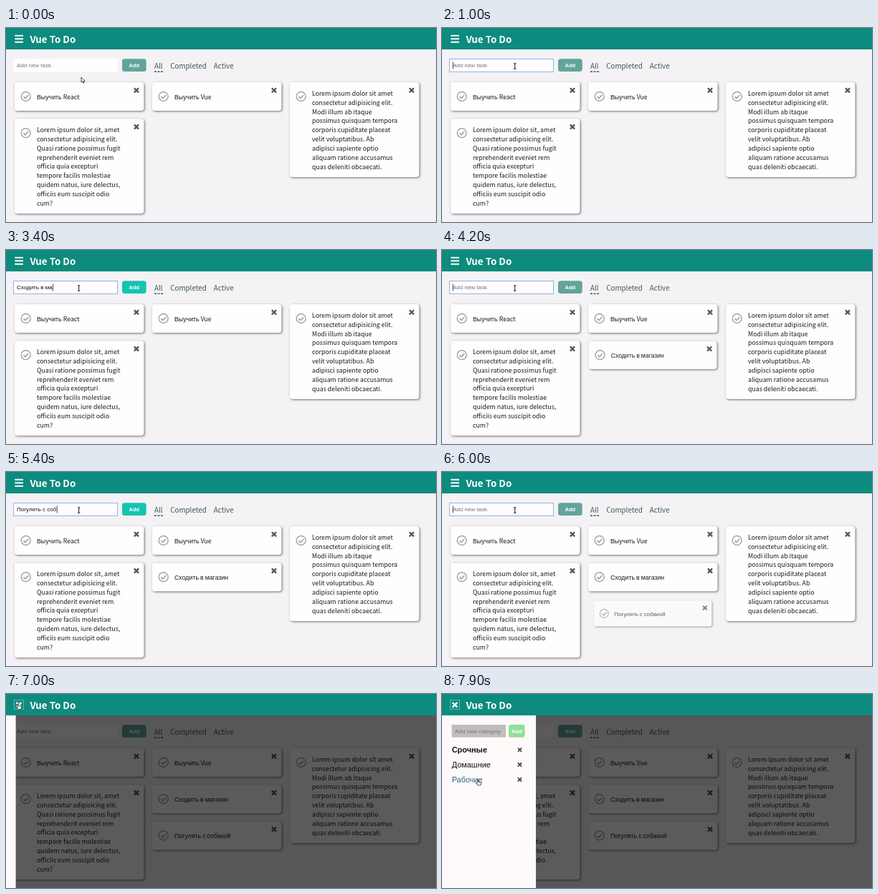
Animation of 600x272 px, one loop 8000 ms. Source, as an HTML page:

```html
<!DOCTYPE html>
<html lang="en">
<head>
<meta charset="utf-8">
<title>Vue To Do</title>
<style>
  html, body { margin: 0; width: 100%; height: 100%; overflow: hidden; background: #f4f2f4; }
  svg { display: block; width: 600px; height: 272px; }
  text { white-space: pre; font-family: "Noto Sans CJK SC", "Noto Sans CJK JP", "Noto Sans CJK", "Noto Sans", sans-serif; }
  .arial, .ru { font-family: "Liberation Sans", Arial, sans-serif; }
  .body { font-size: 8.8px; fill: #1c1a1c; }
  .field { font-size: 8px; }
  .button { font-size: 7.6px; font-weight: bold; fill: #fff; text-anchor: middle; }
  .tab { font-size: 9.84px; fill: #3f5857; }
  .category { font-size: 10.93px; }
  .paper { fill: #fffdff; filter: drop-shadow(1px 1px 1.4px rgba(0, 0, 0, .55)); }
  .line { fill: none; }
</style>
</head>
<body>
<svg id="stage" viewBox="0 0 600 272" xmlns="http://www.w3.org/2000/svg"></svg>
<script>
const LOOP = 8000, STEP = 100;
const FOCUS = 1000, FIRST_ADD = 4000, SECOND_ADD = 5900, MENU_OPEN = 6910;
const MENU_WIDTH = 131;

const cross = (x, y, r, color, width) =>
  `<path class="line" d="M${x - r} ${y - r}l${2 * r} ${2 * r}m0 ${-2 * r}l${-2 * r} ${2 * r}" stroke="${color}" stroke-width="${width}"/>`;

const label = (x, y, cls, text, attrs = '') =>
  `<text x="${x}" y="${y}" class="${cls}" ${attrs}>${text}</text>`;

const box = (x, y, w, h, fill, attrs = '') =>
  `<rect x="${x}" y="${y}" width="${w}" height="${h}" fill="${fill}" ${attrs}/>`;

// Cyrillic words use a different face from the Latin ones.
const mixed = text => text.replace(/[а-яё]+/gi, '<tspan class="ru">$&</tspan>');

function card(x, y, lines, id = '') {
  const tall = lines.length > 1;
  const text = lines.map((line, i) =>
    label(x + 31, tall ? y + 18.8 + i * 12.85 : y + 23.6, 'body', mixed(line))).join('');
  return `<g id="${id}">
    <rect class="paper" x="${x}" y="${y}" width="180.5" height="${tall ? 133 : 40}" rx="4"/>
    <g class="line" stroke="#a5a3a5" stroke-width="1.4">
      <circle cx="${x + 15.7}" cy="${y + 20}" r="6.5"/>
      <path d="M${x + 12.5} ${y + 20.2}l2.4 2.4 4.4-4.6" stroke-width="1.7"/>
    </g>
    ${cross(x + 170, y + 11.3, 3.1, '#565356', 2.3)}${text}</g>`;
}

const leftText = ['Lorem ipsum dolor sit, amet', 'consectetur adipisicing elit.',
  'Quasi ratione possimus fugit', 'reprehenderit eveniet rem', 'officia quia excepturi',
  'tempore facilis molestiae', 'quidem natus, iure delectus,', 'officiis eum suscipit odio', 'cum?'];
const rightText = ['Lorem ipsum dolor sit amet', 'consectetur adipisicing elit.',
  'Modi illum ab itaque', 'possimus quisquam tempora', 'corporis cupiditate placeat',
  'velit voluptatibus. Ab', 'adipisci sapiente optio', 'aliquam ratione accusamus', 'quas deleniti obcaecati.'];
const categories = ['Срочные', 'Домашние', 'Рабочие'];
const categoryY = i => 82.3 + i * 20.8;

const stage = document.getElementById('stage');
stage.innerHTML = `
  ${box(0, 0, 600, 272, '#f4f2f4')}
  ${box(10, 43, 146, 19, '#fffdff')}
  ${box(10.5, 43.5, 145, 18, 'none', 'id="ring" stroke="#8fb5e6"')}
  ${label(15, 55.2, 'arial field', '', 'id="entry"')}
  ${box(0, 47.5, .8, 10, '#222', 'id="caret"')}
  ${box(162, 43.3, 33.7, 17.7, '', 'id="add" rx="3.5"')}
  ${label(178.8, 54.6, 'arial button', 'Add')}
  ${label(207, 56.6, 'tab', 'All')}
  ${label(229.2, 56.6, 'tab', 'Completed')}
  ${label(289.8, 56.6, 'tab', 'Active')}
  <path d="M207 61.2h12" stroke="#3f5857" stroke-width="1.4" stroke-dasharray="3 1.5"/>
  ${card(12, 76, ['Выучить React'])}
  ${card(204, 76, ['Выучить Vue'])}
  ${card(396, 76, rightText)}
  ${card(12, 127.2, leftText)}
  ${card(204, 127.2, ['Сходить в магазин'], 'shop')}
  ${card(204, 178.4, ['Погулять с собакой'], 'walk')}
  ${box(0, 30, 600, 242, '#000', 'id="shade" opacity=".64"')}
  <g id="menu">
    ${box(0, 30, MENU_WIDTH, 242, '#fffafa')}
    ${box(13.5, 43, 75.5, 17.7, '#c0bdbe')}
    ${label(18, 54.7, 'arial field', 'Add new category', 'fill="#757375"')}
    ${box(93, 43, 22.5, 17.7, '#8fe096', 'rx="3"')}
    ${label(104.2, 54.6, 'arial button', 'Add')}
    ${categories.map((name, i) =>
      label(13.7, categoryY(i), 'arial category', name, i ? '' : 'font-weight="bold"') +
      cross(108.5, categoryY(i) - 4, 2.6, '#4c494b', 1.9)).join('')}
  </g>
  ${box(0, 0, 600, 30, '#0d8b7e')}
  <path id="bars" d="M12.3 10.7h11.7M12.3 15.2h11.7M12.3 19.7h11.7" stroke="#fff" stroke-width="2"/>
  <g id="close">
    ${cross(18, 15.2, 3.4, '#fff', 2.5)}
    ${box(11.5, 8.5, 13, 13, 'none', 'stroke="#fff" stroke-width=".7" stroke-dasharray="1 1"')}
  </g>
  ${label(33.5, 20.6, '', 'Vue To Do', 'font-size="13.4" font-weight="bold" fill="#fff"')}
  <g id="arrow"><path d="M0 0v7.2l1.7-1.5 1.2 2.7 1.2-.6-1.2-2.5h2.3z" fill="#fff" stroke="#222" stroke-width=".8"/></g>
  <g id="beam"><path class="line" d="M-1.7-3.7h3.4M0-3.7v7.4M-1.7 3.7h3.4" stroke="#222" stroke-width="1.1"/></g>
  <g id="hand"><path d="M-1.8-3.5q.8-.8 1.4 0v2.6l3.3.6q.9.3.7 1.4l-.5 2.8h-4.4l-2.3-3.2q.2-.9 1.8.2z" fill="#fff" stroke="#222" stroke-width=".8"/></g>`;

const el = id => document.getElementById(id);
const show = (id, on) => el(id).setAttribute('visibility', on ? 'visible' : 'hidden');
const clamp = p => Math.max(0, Math.min(1, p));
const smooth = p => p * p * (3 - 2 * p);
const easeOut = p => 1 - (1 - p) ** 3;

const keys = [];
const type = (start, step, text) => [...text].forEach((char, i) => keys.push({ at: start + i * step, char }));
type(1500, 150, 'Схо');
type(2200, 200, 'ж\b');
type(2600, 100, 'дить в магазин');
type(FIRST_ADD, 0, '\n');
type(4300, 60, 'Погу');
type(4600, 70, 'лять с с');
type(5300, 100, 'обакой');
type(SECOND_ADD, 0, '\n');

function entryAt(t) {
  let text = '', last = FOCUS;
  for (const { at, char } of keys) {
    if (at > t) break;
    last = at;
    text = char === '\n' ? '' : char === '\b' ? text.slice(0, -1) : text + char;
  }
  return { text, last };
}

const path = [
  [0, 105, 69], [300, 105, 69], [900, 101.7, 53.5], [6150, 101.7, 53.5],
  [6750, 18, 17.5], [7150, 18, 17.5], [7800, 51, 124], [LOOP, 51, 124]
];

function pointerAt(t) {
  const i = path.findIndex(([at]) => at > t);
  const [t0, x0, y0] = path[i - 1], [t1, x1, y1] = path[i];
  const p = smooth((t - t0) / (t1 - t0));
  return [x0 + (x1 - x0) * p, y0 + (y1 - y0) * p];
}

function popIn(id, cx, cy, p) {
  const s = .7 + .3 * easeOut(p);
  show(id, p > 0);
  el(id).setAttribute('opacity', easeOut(p));
  el(id).setAttribute('transform', `translate(${cx} ${cy}) scale(${s}) translate(${-cx} ${-cy})`);
}

function draw(t) {
  const open = t >= MENU_OPEN, focused = t >= FOCUS && !open;
  const { text, last } = entryAt(t);
  const entry = el('entry');
  entry.textContent = text || 'Add new task';
  entry.setAttribute('fill', text ? '#111' : '#757375');
  show('ring', focused);
  show('caret', focused && Math.floor((t - last) / 500) % 2 === 0);
  el('caret').setAttribute('x', text ? 15.4 + entry.getComputedTextLength() : 14.8);
  el('add').setAttribute('fill', text ? '#14c4b0' : '#62a49c');

  popIn('shop', 294.2, 147.2, clamp((t - FIRST_ADD) / 300));
  popIn('walk', 294.2, 198.4, clamp((t - SECOND_ADD) / 300));

  const slide = smooth(clamp((t - MENU_OPEN) / 450));
  el('menu').setAttribute('transform', `translate(${MENU_WIDTH * (slide - 1)} 0)`);
  show('menu', open);
  show('shade', open);
  show('close', open);
  show('bars', !open);

  const [x, y] = pointerAt(t);
  const names = [...document.querySelectorAll('.category')];
  const hovered = names.findIndex((_, i) => open && x > 13 && x < 70 && Math.abs(y - categoryY(i) + 3) < 8);
  names.forEach((name, i) => name.setAttribute('fill', i === hovered ? '#28657a' : '#111'));
  const onButton = x > 11 && x < 25 && y < 23;
  const onInput = !open && x > 10 && x < 156 && y > 43 && y < 62;
  const cursor = onButton || hovered >= 0 ? 'hand' : onInput ? 'beam' : 'arrow';
  for (const id of ['arrow', 'beam', 'hand']) show(id, id === cursor);
  el(cursor).setAttribute('transform', `translate(${x} ${y})`);
}

const begin = performance.now();
function tick() {
  const t = (performance.now() - begin) % LOOP;
  draw(Math.floor(t / STEP) * STEP);
  requestAnimationFrame(tick);
}
tick();
</script>
</body>
</html>
```
